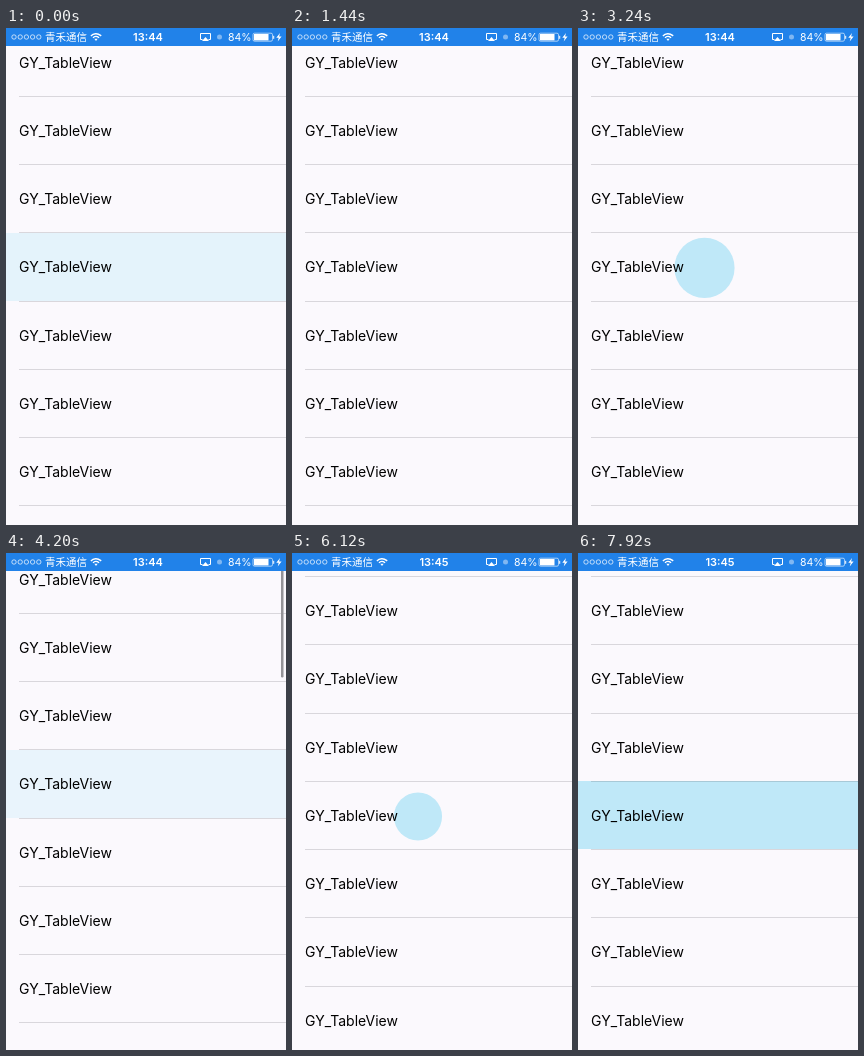
Write an HTML page with a canvas that moves like this. It is 280x497 px and loops after 8 s.

```html
<!DOCTYPE html>
<html lang="zh">
<head>
<meta charset="utf-8">
<title>Ripple table</title>
<style>
html, body { margin: 0; height: 100%; overflow: hidden; background: #fbf9fd; }
canvas { display: block; }
</style>
</head>
<body>
<canvas id="stage" width="280" height="497"></canvas>
<script>
const W = 280, H = 497, LOOP = 8000, ROW = 68.25, ROWS = 30, BAR = 18;
const SCROLL_END = 249.3;
const c = document.getElementById('stage').getContext('2d');

// Each tap: row, touch x, grow start, grow end, fade start, fade end
const taps = [
  [3, 126, -900, -500, -470, 300],
  [3, 126, 690, 1190, 1325, 1430],
  [3, 126, 1740, 2240, 2300, 2740],
  [3, 126.5, 3065, 3470, 3800, 4370],
  [7, 126, 5830, 6580, 6850, 7065],
  [7, 126, 7110, 7530, 9000, 9500]
];

const clamp = v => Math.max(0, Math.min(1, v));
const span = (t, a, b) => clamp((t - a) / (b - a));
const smooth = p => p * p * (3 - 2 * p);

function rect(x, y, w, h, color) {
  c.fillStyle = color;
  c.fillRect(x, y, w, h);
}

function text(str, x, y, font, color, align = 'left') {
  c.font = font;
  c.fillStyle = color;
  c.textAlign = align;
  c.fillText(str, x, y);
}

function disc(x, y, r) {
  c.beginPath();
  c.arc(x, y, r, 0, 7);
  c.fill();
}

function poly(...p) {
  c.beginPath();
  for (let i = 0; i < p.length; i += 2) c.lineTo(p[i], p[i + 1]);
  c.closePath();
  c.fill();
}

function ripple(t, off, [row, x, g0, g1, f0, f1]) {
  if (t < g0 || t > f1) return;
  const y = row * ROW - off;
  const reach = Math.hypot(Math.max(x, W - x), ROW / 2) + 2;
  c.save();
  c.beginPath();
  c.rect(0, Math.round(y), W, Math.round(ROW));
  c.clip();
  c.globalAlpha = 1 - span(t, f0, f1);
  c.fillStyle = '#bfe8f8';
  disc(x, y + ROW / 2 + 1, reach * span(t, g0, g1) ** 2);
  c.restore();
}

function scrollBar(t, off) {
  c.globalAlpha = span(t, 4080, 4160) * (1 - span(t, 5060, 5380));
  c.fillStyle = '#949397';
  c.beginPath();
  c.roundRect(275, 2.5 + off * H / (ROW * ROWS), 2.5, 120, 1.2);
  c.fill();
  c.globalAlpha = 1;
}

function statusBar(t) {
  rect(0, 0, W, BAR, '#2182e9');
  c.strokeStyle = '#fff';
  c.lineWidth = 0.7;
  for (let i = 0; i < 5; i++) {
    c.beginPath();
    c.arc(8 + i * 6.2, 9, 2.2, 0, 7);
    c.stroke();
  }
  text('青禾通信', 39, 12.7, '10.5px "Noto Sans CJK SC", "Noto Sans CJK", sans-serif', '#fff');

  // Wi-Fi
  c.lineWidth = 1.4;
  for (const r of [4, 6.8]) {
    c.beginPath();
    c.arc(90, 12.5, r, -Math.PI * 0.77, -Math.PI * 0.23);
    c.stroke();
  }
  c.fillStyle = '#fff';
  poly(90, 13, 88.3, 10.8, 91.7, 10.8);

  text(t < 4560 ? '13:44' : '13:45', 142, 13, '600 11px Inter, sans-serif', '#fff', 'center');

  // Screen sharing
  c.lineWidth = 1;
  c.beginPath();
  c.moveTo(196.5, 11.5);
  c.lineTo(194.5, 11.5);
  c.lineTo(194.5, 5.5);
  c.lineTo(204.5, 5.5);
  c.lineTo(204.5, 11.5);
  c.lineTo(202.5, 11.5);
  c.stroke();
  poly(199.5, 9, 203, 13, 196, 13);

  c.fillStyle = '#80b7f2';
  disc(213.5, 9, 2.5);

  text('84%', 222, 13, '10.5px Inter, sans-serif', '#fff');

  // Battery
  c.lineWidth = 0.6;
  c.beginPath();
  c.roundRect(247, 5.2, 19.5, 8, 1.5);
  c.stroke();
  rect(248, 6, 14.5, 6.4, '#fff');
  rect(267.2, 7.8, 1, 3, '#fff');
  poly(274, 5, 270.3, 9.8, 272.7, 9.8, 271.7, 13.5, 275.6, 8.5, 273.1, 8.5);
}

function draw(t) {
  const off = SCROLL_END * smooth(span(t, 4110, 4970));
  rect(0, 0, W, H, '#fbf9fd');
  for (const tap of taps) ripple(t, off, tap);
  for (let i = 0; i < ROWS; i++) {
    const y = i * ROW - off;
    if (y < -ROW || y > H) continue;
    text('GY_TableView', 13, y + 39.5, '14px Inter, sans-serif', '#000');
    rect(13, Math.floor(y + ROW), W - 13, 1, 'rgba(60,60,70,.18)');
  }
  scrollBar(t, off);
  statusBar(t);
}

function frame(now) {
  draw(now % LOOP);
  requestAnimationFrame(frame);
}
draw(0);
requestAnimationFrame(frame);
</script>
</body>
</html>
```
